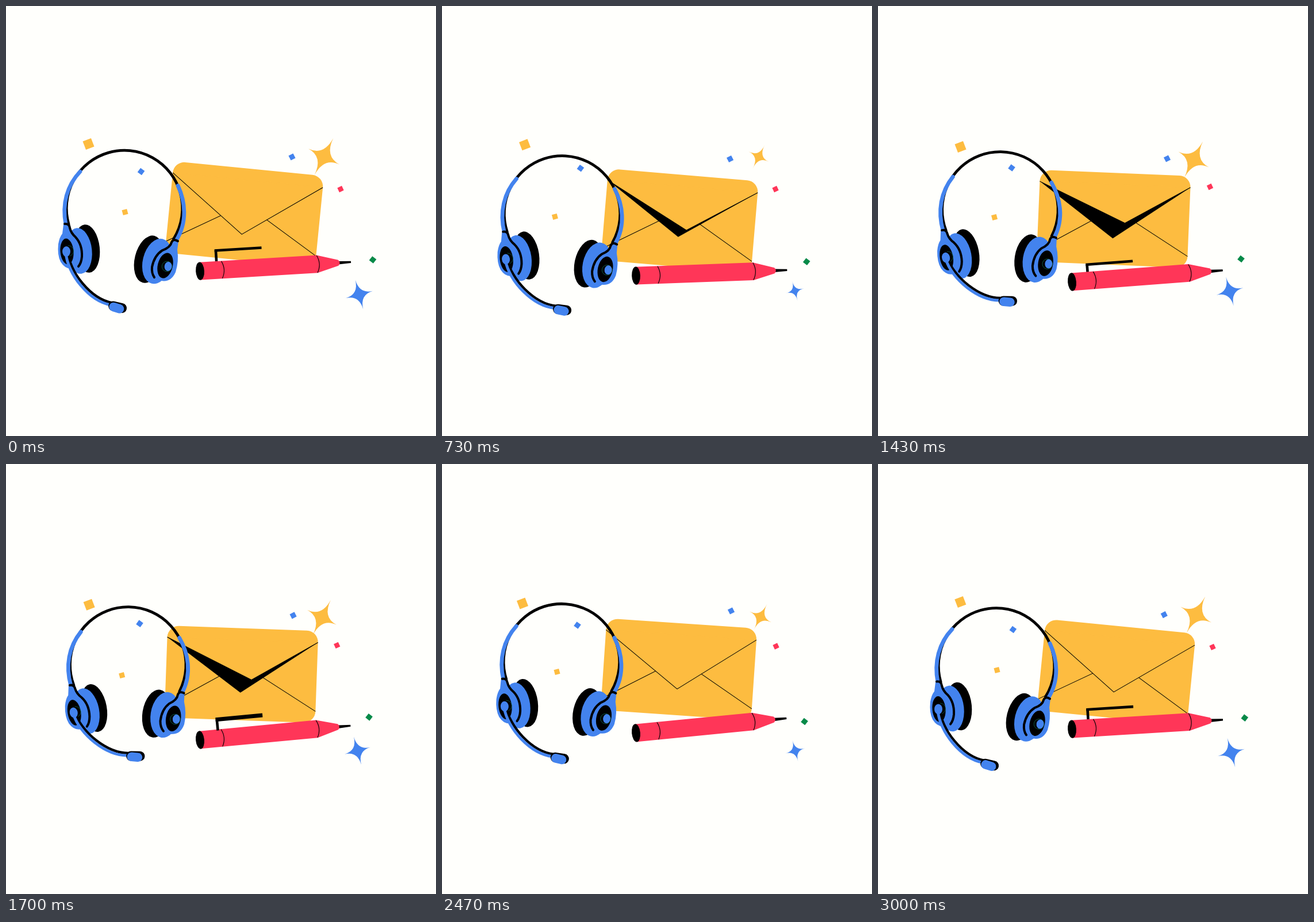
An HTML page with a canvas for the animation above (3030 ms loop, 748 by 748 pixels).

```html
<!DOCTYPE html>
<html lang="en">
<head>
<meta charset="utf-8">
<title>Contact us</title>
<style>
html, body { margin: 0; width: 100%; height: 100%; overflow: hidden; background: #fffffc; }
canvas { display: block; width: 748px; height: 748px; }
</style>
</head>
<body>
<canvas id="stage" width="748" height="748"></canvas>
<script>
const ctx = document.getElementById('stage').getContext('2d');
const LOOP = 3030, TAU = Math.PI * 2, RAD = Math.PI / 180;
const YELLOW = '#fdbc40', BLUE = '#4383ee', RED = '#ff3658', GREEN = '#078a48', BLACK = '#000', BACK = '#fffffc';

const clamp = v => Math.max(0, Math.min(1, v));
const smooth = v => { v = clamp(v); return v * v * (3 - 2 * v); };
const mix = (a, b, k) => a + (b - a) * k;

// Closed smooth curve through values at the given times
const KEYS = [0, 430, 1030, 1430, 1970, 2470];
function curve(values, t) {
  const n = KEYS.length;
  const time = i => KEYS[(i + n) % n] + LOOP * Math.floor(i / n);
  const val = i => values[(i + n) % n];
  const slope = i => (val(i + 1) - val(i - 1)) / (time(i + 1) - time(i - 1));
  let i = n - 1;
  while (KEYS[i] > t) i--;
  const h = time(i + 1) - time(i), u = (t - time(i)) / h;
  return mix(val(i), val(i + 1), u * u * (3 - 2 * u)) +
    h * u * (1 - u) * (slope(i) * (1 - u) - slope(i + 1) * u);
}

function poly(points, fill) {
  ctx.beginPath();
  for (const [x, y] of points) ctx.lineTo(x, y);
  ctx.closePath();
  ctx.fillStyle = fill;
  ctx.fill();
}

function line(points, width, color = BLACK) {
  ctx.beginPath();
  for (const [x, y] of points) ctx.lineTo(x, y);
  ctx.lineWidth = width;
  ctx.strokeStyle = color;
  ctx.stroke();
}

function oval(x, y, rx, ry, deg, fill) {
  ctx.beginPath();
  ctx.ellipse(x, y, rx, ry, deg * RAD, 0, TAU);
  ctx.fillStyle = fill;
  ctx.fill();
}

function ring(x, y, r, width, color, from = 0, to = 360) {
  ctx.beginPath();
  ctx.arc(x, y, r, from * RAD, to * RAD);
  ctx.lineWidth = width;
  ctx.strokeStyle = color;
  ctx.stroke();
}

function shape(d, fill) {
  ctx.fillStyle = fill;
  ctx.fill(new Path2D(d));
}

function stroke(d, width, color) {
  ctx.lineWidth = width;
  ctx.strokeStyle = color;
  ctx.stroke(new Path2D(d));
}

function turn(x, y, deg) {
  ctx.translate(x, y);
  ctx.rotate(deg * RAD);
  ctx.translate(-x, -y);
}

function group(draw) {
  ctx.save();
  draw();
  ctx.restore();
}

const confetti = [
  { color: YELLOW, size: 15.5, deg: -21, x: [143.5, 145, 143, 143.5, 145, 140], y: [240, 240.5, 242.5, 245, 244, 242.5] },
  { color: BLUE, size: 9, deg: 36, x: [235, 242, 238, 232.5, 233.5, 235.5], y: [288, 281, 284, 281.5, 275, 280.5] },
  { color: YELLOW, size: 9, deg: -15, x: [207, 199, 196, 202.5, 200, 200], y: [358.5, 364, 368, 367.5, 367, 361.5] },
  { color: BLUE, size: 9, deg: -27, x: [497.5, 495, 507, 503, 497.5, 503], y: [262.5, 267, 264.5, 265.5, 260.5, 255.5] },
  { color: RED, size: 8.5, deg: -25, x: [582, 580.5, 579.5, 577.5, 575, 581], y: [318.5, 321, 315.5, 314.5, 316.5, 317] },
  { color: GREEN, size: 9, deg: 38, x: [638, 636.5, 632, 631.5, 631.5, 630.5], y: [441.5, 444.5, 444, 440, 442, 448] }
];

const stars = [
  { color: YELLOW, deg: 27, size: 29.5, swing: 6.3, side: .84, x: [553, 551.5, 550.5, 549, 550.5, 554], y: [262, 261, 264, 267, 266, 266] },
  { color: BLUE, deg: -15, size: 22, swing: 4.3, side: .92, x: [614.5, 614, 613.5, 612, 611.5, 614.5], y: [502, 498, 494, 496.5, 500.5, 499] }
];

function drawConfetti(t) {
  for (const c of confetti) group(() => {
    ctx.translate(curve(c.x, t), curve(c.y, t));
    ctx.rotate(c.deg * RAD);
    ctx.fillStyle = c.color;
    ctx.fillRect(-c.size / 2, -c.size / 2, c.size, c.size);
  });
}

function drawStars(t) {
  const pulse = Math.cos(2 * TAU * t / LOOP);
  for (const s of stars) group(() => {
    ctx.translate(curve(s.x, t), curve(s.y, t));
    ctx.rotate(s.deg * RAD);
    const a = s.size + s.swing * pulse, b = a * s.side;
    const w = (.005 + .025 * pulse) * s.size;
    ctx.beginPath();
    ctx.moveTo(0, -a);
    ctx.quadraticCurveTo(w, -w, b, 0);
    ctx.quadraticCurveTo(w, w, 0, a);
    ctx.quadraticCurveTo(-w, w, -b, 0);
    ctx.quadraticCurveTo(-w, -w, 0, -a);
    ctx.fillStyle = s.color;
    ctx.fill();
  });
}

function drawEnvelope(t) {
  const p = TAU * t / LOOP;
  const left = -244.5, right = 17.8, top = -156, bottom = 4, r = 20;
  const open = smooth(t / 1170) - smooth((t - 1500) / 1060);
  const tip = [mix(-114.5, -93.5, open), mix(-41, -69.5, open)];
  const q = clamp((open - .3) / .7);
  const bend = (a, c, b) => a * (1 - q) ** 2 + 2 * c * q * (1 - q) + b * q * q;
  const pocket = [bend(-108.2, -116, -113.5), bend(-49.5, -50, -42)];
  const a = [left, top + r], b = [right, top + r];
  group(() => {
    ctx.translate(520, 449.3 + 9.5 * Math.sin(p));
    ctx.rotate((3.95 + 1.9 * Math.cos(p - 25 * RAD)) * RAD);
    ctx.beginPath();
    ctx.roundRect(left, top, right - left, bottom - top, r);
    ctx.fillStyle = YELLOW;
    ctx.fill();
    line([[left, bottom - r], [-113.4, -94], [right, bottom - r]], 1);
    if (q > 0) poly([a, pocket, b], BLACK);
    poly([a, tip, b], YELLOW);
    // hide the seam along the top of the flap
    ctx.fillRect(left + 1, top + r - 1, right - left - 2, 2);
    line([a, tip, b], 1);
  });
}

function penBody() {
  ctx.beginPath();
  ctx.moveTo(0, -15.4);
  ctx.lineTo(204, -15.4);
  ctx.lineTo(241, -5);
  ctx.quadraticCurveTo(246, 0, 241, 5);
  ctx.lineTo(204, 15.4);
  ctx.lineTo(0, 15.4);
  ctx.closePath();
}

function drawPen(t) {
  const p = TAU * t / LOOP, c = Math.cos(p), s = Math.sin(p);
  const capY = 470.7 - 9.6 * c - 1.1 * s, nibY = 452 - 6.6 * c + 7.8 * s;
  const roll = 2 * p - 19 * RAD, side = Math.sin(roll), up = Math.cos(roll);

  const clip = () => {
    const x = 28.5 + 4 * side, y = -36 * up, foot = -15 * up;
    const thick = 4.6 + 5.4 * Math.max(0, side);
    ctx.fillStyle = BLACK;
    ctx.fillRect(x, y - thick / 2, 82, thick);
    if (up > 0) ctx.fillRect(x, y, 4.6, foot - y);
  };

  group(() => {
    ctx.translate(337.5, capY);
    ctx.rotate(Math.atan2(nibY - capY, 262.5));
    if (side < 0 && up > 0) clip();
    poly([[241, -2.8], [263, -1.6], [263, 1.6], [241, 2.8]], BLACK);
    penBody();
    ctx.fillStyle = RED;
    ctx.fill();
    oval(0, 0, 7.4, 15.7, 0, BLACK);
    for (const x of [38, 204]) stroke(`M${x} -15 Q${x + 8} 0 ${x} 15`, 1.1, BLACK);
    if (side >= 0) {
      // the clip disappears beneath the barrel's lower edge
      ctx.beginPath();
      ctx.rect(0, -60, 270, 75.4);
      ctx.clip();
      clip();
    }
  });
}

function drawLeftEar() {
  oval(141, 422, 22, 42, -6, BLACK);
  oval(127, 426, 22.5, 40, -6, BLUE);
  shape('M100 380 Q106 376 110 382 Q111 394 120 403 Q130 416 130 432 Q130 450 119 456 Q104 460 95 445 Q89 433 91 414 Q93 402 98 396 Z', BLUE);
  stroke('M102 379 Q110 378 111 386 Q113 395 121 402 Q133 415 132 436 Q131 447 126 453', 4, BLACK);
  oval(106, 427, 11.5, 22.5, -5, BLACK);
  ring(108, 426, 9.5, .8, '#12624a', -90, 80);
}

function drawRightEar() {
  oval(248, 440.5, 24, 42, 14, BLACK);
  oval(263, 444, 25, 40, 14, BLUE);
  shape('M290 406 Q296 404 300 409 L298 424 Q301 444 295 463 Q287 481 270 478 Q256 474 257 455 Q259 435 270 427 Q287 421 290 406 Z', BLUE);
  stroke('M299 409 Q291 404 288 411 Q286 420 272 425 Q258 434 254 454 Q253 465 258 472', 4, BLACK);
  oval(277, 451.5, 13, 22.5, 14, BLACK);
  ring(280, 453, 8.8, .9, '#12624a');
  oval(282, 453, 6.4, 8, 8, BLUE);
}

function drawMic(t) {
  const p = TAU * t / LOOP;
  group(() => {
    turn(105, 427, -3.85 * (1 - Math.cos(p - .12)));
    const boom = 'M105 428 C108 465 145 512 183 519';
    group(() => { ctx.translate(2, -2.5); stroke(boom, 4.4, BLACK); });
    group(() => { ctx.translate(-1, 1); stroke(boom, 5, BLUE); });
    oval(105, 427, 7, 9, 0, BLUE);
    line([[186.5, 522], [201.5, 525.5]], 17);
    line([[187, 523.5], [197.5, 526.8]], 15.6, BLUE);
  });
}

function drawHeadset(t) {
  const p = TAU * t / LOOP;
  group(() => {
    ctx.translate(0, 9 * Math.sin(p));
    turn(219, 277, -2.45 * (1 - Math.cos(p)));
    ctx.lineCap = 'round';
    ring(206, 352, 100.8, 4.8, BLACK, 164, 392);
    stroke('M129 288 C106 312 97 345 104 380', 6.8, BLUE);
    stroke('M299 312.5 C312 340 316 376 296 408', 6.8, BLUE);
    drawLeftEar();
    drawRightEar();
    drawMic(t);
  });
}

function frame(now) {
  const t = now % LOOP;
  ctx.fillStyle = BACK;
  ctx.fillRect(0, 0, 748, 748);
  drawEnvelope(t);
  drawPen(t);
  drawStars(t);
  drawHeadset(t);
  drawConfetti(t);
}

const start = performance.now();
function tick() {
  frame(performance.now() - start);
  requestAnimationFrame(tick);
}
tick();
</script>
</body>
</html>
```
